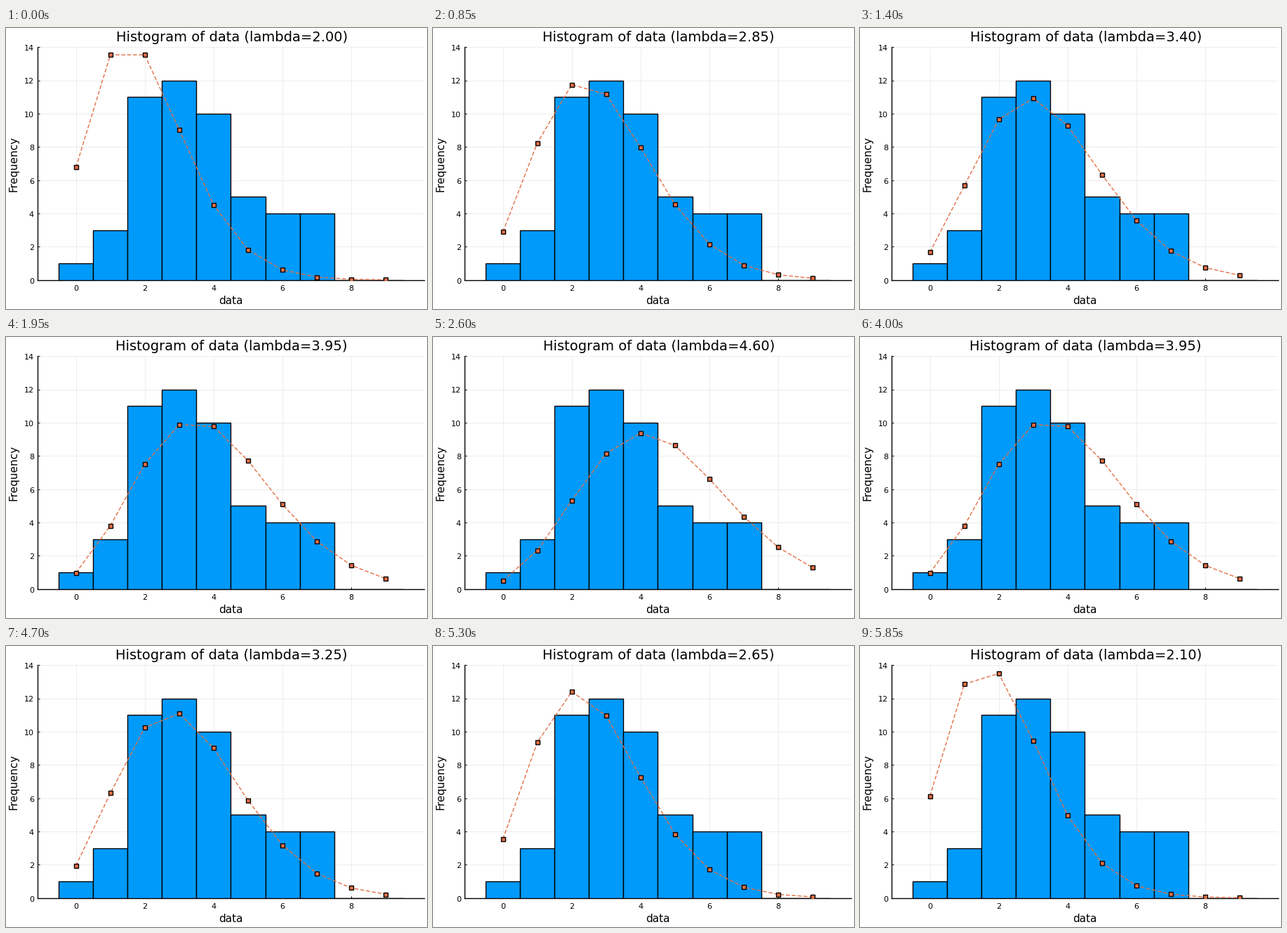
Write a matplotlib script that moves like this. It is 600 px wide and 400 px high and loops after 5.9 s.

```python
from math import exp, factorial

import matplotlib.pyplot as plt
import numpy as np
from matplotlib.animation import FuncAnimation

W, H, DPI = 600, 400, 100
LEFT, RIGHT, TOP, BOTTOM = 44.77, 596.1, 27.24, 358.65
XMIN, XMAX, YMAX = -1.118, 10.118, 14
COUNTS = [1, 3, 11, 12, 10, 5, 4, 4, 0, 0]
BLUE, ORANGE = "#009afa", "#e26f46"
STEP, PEAK, FRAMES = 0.05, 60, 118

plt.rcParams["font.family"] = "DejaVu Sans"

fig = plt.figure(figsize=(W / DPI, H / DPI), dpi=DPI, facecolor="white")
ax = fig.add_axes([LEFT / W, 1 - BOTTOM / H,
                   (RIGHT - LEFT) / W, (BOTTOM - TOP) / H])
ax.set_xlim(XMIN, XMAX)
ax.set_ylim(0, YMAX)
ax.set_xticks(range(0, 10, 2))
ax.set_yticks(range(0, 15, 2))
ax.set_axisbelow(True)
ax.grid(color="black", alpha=0.1, linewidth=0.5)
ax.tick_params(direction="in", length=2.4, width=0.7, labelbottom=False,
               labelleft=False)
ax.spines[["top", "right"]].set_visible(False)
for side in ("left", "bottom"):
    ax.spines[side].set_linewidth(1)


def label(x, y, text, size, ha="center", va="baseline", **kw):
    """Place text at stage pixels, measured from the top left."""
    return fig.text(x / W, 1 - y / H, text, fontsize=size, ha=ha, va=va, **kw)


def px(x):
    return LEFT + (x - XMIN) / (XMAX - XMIN) * (RIGHT - LEFT)


def py(y):
    return BOTTOM - y / YMAX * (BOTTOM - TOP)


for t in range(0, 10, 2):
    label(px(t), 374.3, str(t), 8)
for t in range(0, 15, 2):
    label(40, py(t) + 4.9, str(t), 8, ha="right")

label(320.65, 393, "data", 11)
label(18.2, 193.5, "Frequency", 11, ha="right", va="center", rotation=90)
title = label(321.65, 19.2, "", 14)

k = np.arange(10)
ax.bar(k, COUNTS, width=1, color=BLUE, edgecolor="black", linewidth=1,
       zorder=3)
scale = sum(COUNTS) / np.array([factorial(n) for n in k])
curve, = ax.plot(k, 0 * k, color=ORANGE, linewidth=1, dashes=(4, 2),
                 marker="s", markersize=4.2, markerfacecolor=ORANGE,
                 markeredgecolor="black", markeredgewidth=1, zorder=4)


def rate(i):
    """Climb from 2 to 5, then step back down to 2.1."""
    return 2 + STEP * i if i <= PEAK else 4.9 - STEP * (i - PEAK - 1)


def draw(i):
    lam = rate(i)
    curve.set_ydata(scale * lam ** k * exp(-lam))
    title.set_text(f"Histogram of data (lambda={lam:.2f})")
    return curve, title


anim = FuncAnimation(fig, draw, frames=FRAMES, interval=50, repeat=True,
                     repeat_delay=0)
plt.show()
```
